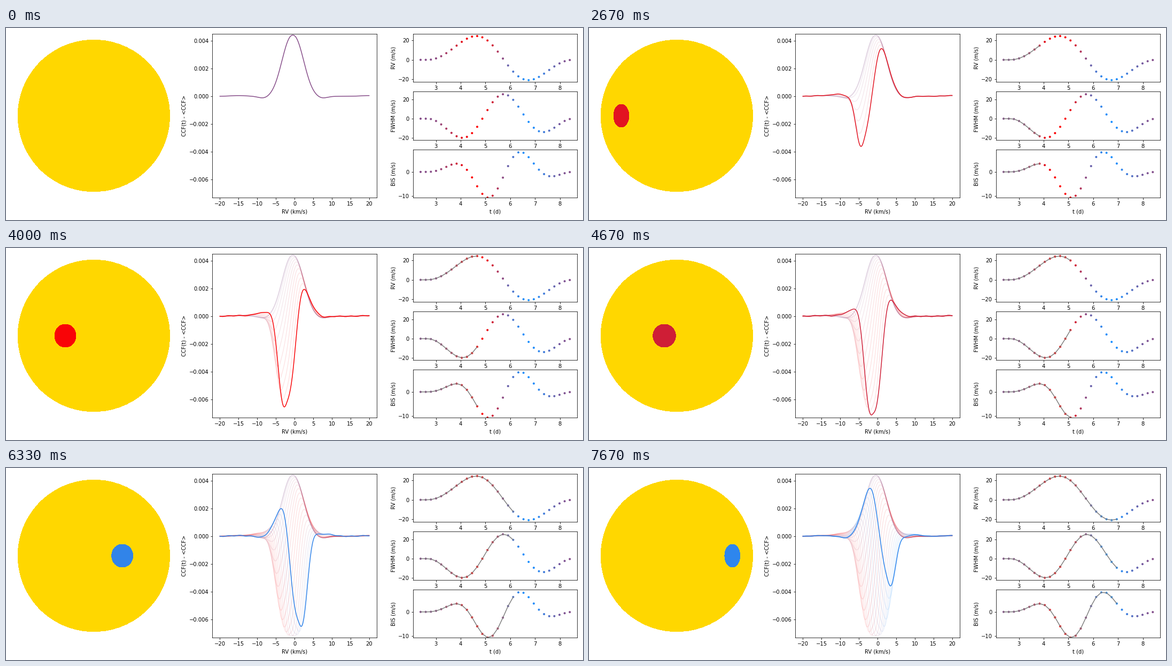
Animation of 1080 by 360 pixels, one loop 8000 ms. Source, as a matplotlib script:

```python
import numpy as np
import matplotlib.pyplot as plt
from matplotlib.animation import FuncAnimation
from matplotlib.colors import LinearSegmentedColormap
from matplotlib.patches import Circle, Polygon

W, H, DPI = 1080, 360, 72
STEPS = 24                 # observations shown in one loop
TICK, TICKS = 50, 160      # ms per drawn frame, frames per loop
SPOT = np.radians(8.7)     # angular radius of the spot


def longitude(i):
    return np.radians(6.37 * (i - 15.5))


# Time series: each signal follows the projected area q and the side s of the spot
obs = np.arange(30)
t_obs = 2.386 + 0.2074 * obs
s = np.sin(longitude(obs))
q = np.clip(np.cos(longitude(obs)), 0, None) ** 2
rv = -s * q * (45 + 19.5 * q) + 4.9 * q ** 3
fwhm = q * (-76.2 + 78.3 * q + 22.4 * q ** 2) + 22.5 * s * q ** 2
bis = s * q * (-15.3 + 4.4 * q + 51.5 * q ** 2) + q * (-2.7 + 29 * q - 31 * q ** 2)

cmap = LinearSegmentedColormap.from_list("doppler", ["dodgerblue", "red"])
colors = cmap((rv - rv.min()) / np.ptp(rv))
v = np.linspace(-20, 20, 321)


def bump(x, center, width):
    return np.exp(-((x - center) / width) ** 2)


def quiet_profile():
    u = v + 0.45
    core = 0.0044 * np.exp(-np.abs(u / 3.85) ** 2.2)
    lobes = -0.00014 * bump(np.abs(u), 7.8, 2)
    return core + lobes + 0.00005 * (bump(v, -15, 3) + bump(v, 20, 3))


def spot_profile(i):
    """Part of the line profile hidden by the spot."""
    lon = longitude(i)
    if np.cos(lon) <= 0:
        return np.zeros_like(v)
    d = v - 4.1 * np.sin(lon) + 0.47
    width = 2.95 - 0.45 * np.sin(lon) * np.tanh(d)
    core = np.exp(-np.abs(d / width) ** 2.6)
    wings = 0.038 * bump(d, -6.4, 2.6) + 0.026 * bump(d, 6.8, 2.8)
    ripple = 0.0025 * np.sin(2.1 * d) * (1 - np.exp(-(d / 9) ** 4))
    return 0.0116 * np.cos(lon) ** 1.91 * (core - wings + ripple)


def spot_outline(i):
    """Spot edge on the unit sphere, cut off at the limb."""
    lon = longitude(i)
    a = np.linspace(0, 2 * np.pi, 181)
    x = np.cos(SPOT) * np.sin(lon) + np.sin(SPOT) * np.cos(a) * np.cos(lon)
    y = np.sin(SPOT) * np.sin(a)
    depth = np.cos(SPOT) * np.cos(lon) - np.sin(SPOT) * np.cos(a) * np.sin(lon)
    if depth.min() > 0:              # whole spot inside the limb
        x = x * (1 - 0.022 * x ** 12)
    else:
        x = np.where(depth < 0, np.copysign(np.sqrt(1 - y ** 2), x), x)
    return np.column_stack([x, y])


fig = plt.figure(figsize=(W / DPI, H / DPI), dpi=DPI, facecolor="white")
grid = fig.add_gridspec(1, 3)

# Star
star = fig.add_subplot(grid[0])
star.set(xlim=(-1.08, 1.08), ylim=(-1.08, 1.08))
star.axis("off")
star.add_patch(Circle((0, 0), 1, color="gold", lw=0, antialiased=False))
spot = star.add_patch(Polygon(spot_outline(4), lw=0, antialiased=False))

# Line profile
ccf = fig.add_subplot(grid[1])
ccf.set(xlim=(-22, 22), ylim=(-0.0073, 0.0045),
        xlabel="RV (km/s)", ylabel="CCF(t) - <CCF>")
base = quiet_profile()
curves = [ccf.plot(v, base - spot_profile(i), color=colors[i], lw=1.5)[0]
          for i in range(STEPS)]

# Signals
trails = []
rows = grid[2].subgridspec(3, 1)
for row, data, label, limits, ticks in [
        (0, rv, "RV", (-22.75, 26.75), (-20, 0, 20)),
        (1, fwhm, "FWHM", (-21.9, 28), (-20, 0, 20)),
        (2, bis, "BIS", (-10.6, 9.2), (-10, 0))]:
    ax = fig.add_subplot(rows[row])
    ax.scatter(t_obs, data, c=colors, marker=".", s=36)
    ax.set(xlim=(t_obs[0] - 0.3, t_obs[-1] + 0.3), ylim=limits, yticks=ticks,
           ylabel=f"{label} (m/s)")
    trails.append((ax.plot([], [], color="gray", lw=1.5)[0], data))
ax.set_xlabel("t (d)")

fig.tight_layout()
star.set_aspect("equal")


def update(k):
    i = (3 * (k * TICK + 35) // 1000) % STEPS
    spot.set_visible(i > 0)
    spot.set_xy(spot_outline(i))
    spot.set_facecolor(colors[i])
    for j, curve in enumerate(curves):
        curve.set_visible(j <= i)
        curve.set_alpha(1 if j == i else 0.1)
    for line, data in trails:
        line.set_data(t_obs[:i], data[:i])
    return [spot, *curves, *(line for line, _ in trails)]


anim = FuncAnimation(fig, update, frames=TICKS, interval=TICK, repeat=True,
                     repeat_delay=0, blit=False)
plt.show()
```
